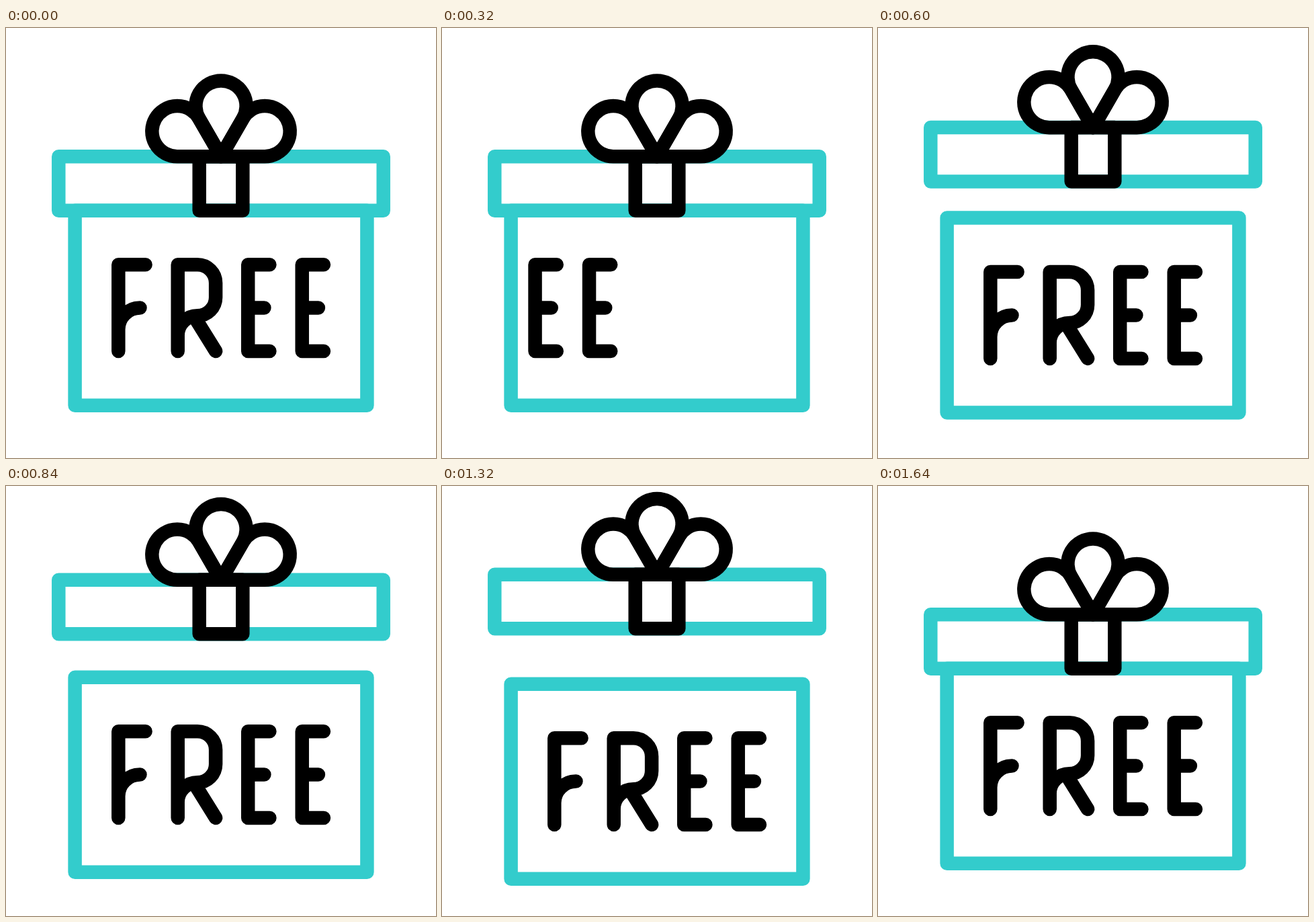
An HTML page that plays this animation: 640x640 px, repeating every 2 s.

```html
<!DOCTYPE html>
<html lang="en">
<head>
<meta charset="utf-8">
<title>Free gift</title>
<style>
  html, body { margin: 0; height: 100%; overflow: hidden; background: #fff; }
  svg { display: block; width: 100vw; height: 100vh; }
  g { fill: none; stroke: #000; stroke-width: 20.5; stroke-linecap: round; stroke-linejoin: round; }
  .teal { stroke: #3cc; }
</style>
</head>
<body>
<svg viewBox="0 0 640 640">
  <defs>
    <clipPath id="window"><rect x="112.8" y="281.9" width="414.4" height="269.6"/></clipPath>
    <path id="petal" d="M0 0L-32.6-56.4A37.6 37.6 0 1 1 32.6-56.4Z"/>
    <path id="e" d="M32.2 352.2H0V481H32.2M0 416.6H24.2"/>
  </defs>
  <g id="box">
    <rect class="teal" x="102.6" y="271.7" width="434.8" height="290"/>
    <g clip-path="url(#window)">
      <g id="word">
        <path d="M207.6 352.2H167.3V481M199.5 416.6A32.2 32.2 0 0 0 167.3 448.8"/>
        <path d="M255.7 481V352.2H284.9A27.2 27.2 0 0 1 312.1 379.4V401A27.2 27.2 0 0 1 284.9 428.2A29.2 29.2 0 0 0 255.7 457.4M281 431L312.1 481"/>
        <use href="#e" x="360.2"/>
        <use href="#e" x="440.7"/>
      </g>
    </g>
  </g>
  <g id="lid">
    <rect class="teal" x="78.3" y="191.2" width="483.4" height="80.5"/>
    <rect x="287.7" y="191.2" width="64.6" height="80.5"/>
    <g transform="translate(320 191.2)">
      <use href="#petal" transform="rotate(-60)"/>
      <use href="#petal" transform="rotate(60)"/>
      <use href="#petal"/>
    </g>
  </g>
</svg>
<script>
const LOOP = 2000, STEP = 40;
const [box, word, lid] = ["box", "word", "lid"].map(id => document.getElementById(id));

const progress = (t, from, to) => Math.min(1, Math.max(0, (t - from) / (to - from)));
const quadInOut = p => p < .5 ? 2 * p * p : 1 - 2 * (1 - p) ** 2;
const move = (el, x, y) => el.setAttribute("transform", `translate(${x} ${y})`);

// The word leaves on the left, then comes back in from the right.
function wordShift(t) {
  const p = progress(t, 120, 600) * 2;
  return p < 1 ? -383 * p ** 3 : 383 * (2 - p) ** 3;
}

function draw(now) {
  const t = Math.floor(now % LOOP / STEP) * STEP;
  const open = quadInOut(progress(t, 400, 680));
  const stretch = progress(t, 680, 1320) ** 4.8;
  const close = (1 - progress(t, 1320, 1640)) ** 2.4;
  move(lid, 0, -(51.5 * open + 8 * stretch) * close);
  move(box, 0, (13 * open + 10 * stretch) * close);
  move(word, wordShift(t), 0);
}

const start = performance.now();
function tick() {
  draw(performance.now() - start);
  requestAnimationFrame(tick);
}
tick();
</script>
</body>
</html>
```
